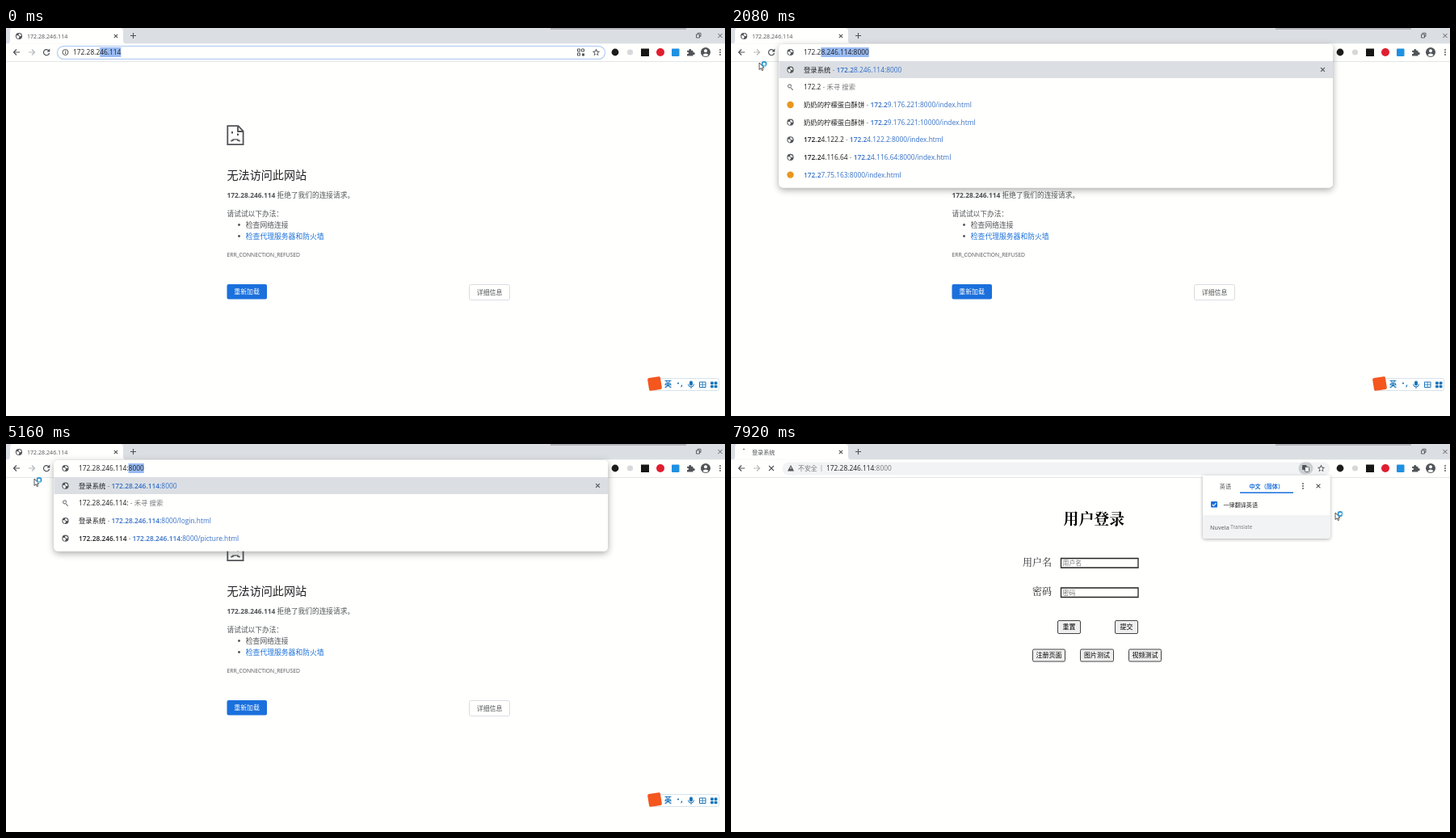
Recreate the animation shown at these times as an HTML page with a canvas. Size 890 by 480 pixels, loop 8000 ms.

```html
<!DOCTYPE html>
<html lang="zh-CN">
<head>
<meta charset="utf-8">
<style>
html, body { margin: 0; width: 100%; height: 100%; overflow: hidden; background: #fffffd; }
canvas { display: block; }
</style>
</head>
<body>
<canvas id="stage" width="890" height="480"></canvas>
<script>
const ctx = document.getElementById('stage').getContext('2d');
const LOOP = 8000;
const SANS = '"Open Sans", "Noto Sans CJK SC", "Noto Sans CJK", sans-serif';
const SERIF = '"Noto Serif CJK SC", "Noto Sans CJK SC", "Noto Sans CJK", serif';
const PAPER = '#fffffd', BAR = '#dbdfe4', PALE = '#f1f3f4';
const INK = '#202124', ICON = '#505357', GREY = '#777a7e', SOFT = '#b6b9bd';
const LINK = '#3570c8', BLUE = '#1a70dc', SELECT = '#98baf2', SHADOW = 'rgba(60, 64, 67, .45)';
const HOST = '172.28.246.114', PORT = ':8000', URL_SIZE = 8.4;

const ENTER = 6440, CLOSE = 6520, COMMIT = 6900, PAINT = 7280, POPUP = 7600;
const TYPE_START = 720;

// When each further character of the address is typed.
const keys = [720, 920, 1200, 1560, 1900, 2400, 2640, 2840, 3040, 3360, 3720,
  4040, 4320, 4680, 5040, 5320, 5600, 5920, 6200];

const globe = 'globe', lens = 'lens';
const recentList = [
  [globe, '登录系统', '127.0.0.1:8000/login.html'],
  [lens],
  ['#93cf92', '127.0.0.1', '127.0.0.1:1316'],
  [globe, '登录系统', '127.0.0.1:8000'],
  [globe, '127.0.0.1', '127.0.0.1:8000/login'],
  ['#807a70', '登录系统', '127.0.0.1:9006/login.html'],
  ['#807a70', 'WebServer', '127.0.0.1:9006']
];
const networkList = [
  [globe, '登录系统', HOST + PORT],
  [lens],
  ['#e8961e', '奶奶的柠檬蛋白酥饼', '172.29.176.221:8000/index.html'],
  [globe, '奶奶的柠檬蛋白酥饼', '172.29.176.221:10000/index.html'],
  [globe, '172.24.122.2', '172.24.122.2:8000/index.html'],
  [globe, '172.24.116.64', '172.24.116.64:8000/index.html'],
  ['#e8961e', '', '172.27.75.163:8000/index.html']
];
const hostList = [
  [globe, '登录系统', HOST + PORT],
  [lens],
  [globe, '登录系统', HOST + PORT + '/login.html'],
  [globe, HOST, HOST + PORT + '/picture.html']
];

const clamp = v => Math.max(0, Math.min(1, v));
const ease = v => { v = clamp(v); return v * v * (3 - 2 * v); };

function rect(x, y, w, h, fill, radius = 0, stroke, width = 1) {
  ctx.beginPath();
  ctx.roundRect(x, y, w, h, radius);
  if (fill) { ctx.fillStyle = fill; ctx.fill(); }
  if (stroke) { ctx.strokeStyle = stroke; ctx.lineWidth = width; ctx.stroke(); }
}
// A raised panel; its shadow stays outside so that it can fade in cleanly.
function panel(x, y, w, h, radius, blur) {
  ctx.save();
  ctx.beginPath();
  ctx.rect(0, 0, 890, 480);
  ctx.roundRect(x, y, w, h, radius);
  ctx.clip('evenodd');
  ctx.shadowColor = SHADOW;
  ctx.shadowBlur = blur;
  ctx.shadowOffsetY = blur / 3;
  rect(x, y, w, h, PAPER, radius);
  ctx.restore();
  rect(x, y, w, h, PAPER, radius);
}
function disc(x, y, r, color) {
  rect(x - r, y - r, 2 * r, 2 * r, color, r);
}
function shape(path, color) {
  ctx.fillStyle = color;
  ctx.fill(new Path2D(path));
}
function line(path, color = ICON, width = 1.1) {
  ctx.strokeStyle = color;
  ctx.lineWidth = width;
  ctx.stroke(new Path2D(path));
}
function setFont(size, weight = 400, family = SANS) {
  ctx.font = `${weight} ${size}px ${family}`;
}
// Draws text centred vertically on y and returns its right edge.
function text(s, x, y, size, color = INK, weight = 400, family = SANS) {
  setFont(size, weight, family);
  ctx.fillStyle = color;
  ctx.fillText(s, x, y + size * .36);
  return x + ctx.measureText(s).width;
}
function widthOf(s, size = URL_SIZE) {
  setFont(size);
  return ctx.measureText(s).width;
}
// Draws text with the part that matches the typed prefix in bold.
function matched(s, typed, x, y, color) {
  let n = 0;
  while (n < typed.length && s[n] === typed[n]) n++;
  x = text(s.slice(0, n), x, y, URL_SIZE, color, 600);
  return text(s.slice(n), x, y, URL_SIZE, color);
}

function drawGlobe(x, y) {
  disc(x, y, 4.1, ICON);
  shape(`M${x - 3} ${y - 1}l2.6 .6l1 1.6l-1.4 2.3q-2.6 -1 -2.2 -4.5z` +
    `M${x} ${y - 3.2}q2.8 .4 3.2 3l-2 .4l-1.6 -1.4z`, PAPER);
}
function drawIcon(icon, x, y) {
  if (icon === globe) drawGlobe(x, y);
  else if (icon === lens) {
    line(`M${x + 1} ${y - 1}a2 2 0 1 0 -.1 .3M${x + .6} ${y + .8}l2.6 2.6`, GREY, 1.1);
  } else disc(x, y, 4.2, icon);
}
function cross(x, y, r = 2.6, width = 1.1) {
  line(`M${x - r} ${y - r}l${2 * r} ${2 * r}m0 ${-2 * r}l${-2 * r} ${2 * r}`, ICON, width);
}
function dots(x, y) {
  for (const dy of [-3, 0, 3]) disc(x, y + dy, .9, ICON);
}
function arc(x, y, r, from, to, color, width) {
  ctx.beginPath();
  ctx.arc(x, y, r, from, to);
  ctx.strokeStyle = color;
  ctx.lineWidth = width;
  ctx.stroke();
}

function drawFrame(t) {
  rect(0, 0, 890, 19.5, BAR);
  rect(674, 0, 168, 2, '#b2b4ba');
  shape('M1 19.5Q5 19.5 5 15V4Q5 0 9 0H141Q145 0 145 4V15Q145 19.5 149 19.5Z', PAPER);
  if (t < CLOSE) drawGlobe(16, 10);
  else arc(16, 10, 3.6, t / 130, t / 130 + .6, GREY, 1.2);
  const title = t < CLOSE ? HOST : t < PAINT ? HOST + PORT : '登录系统';
  text(title, 26, 10, 7.1, ICON);
  cross(136, 10, 2.2);
  line('M154 9.5h7M157.5 6v7');
  line('M854.5 8h4v4h-4zM856 7.8v-1.5h4v4h-1.3', ICON, .9);
  cross(884, 9.5, 2.6, .9);

  rect(0, 19.5, 890, 21.5, PAPER);
  rect(0, 41, 890, 1, '#e3e5e8');
  line('M17 30H9.5M13 26.5L9.5 30L13 33.5', ICON, 1.2);
  line('M28 30h7.5M32 26.5L35.5 30L32 33.5', SOFT, 1.2);
  if (t < CLOSE) {
    line('M53.2 28.3A3.6 3.6 0 1 0 53.6 31', ICON, 1.2);
    shape('M54.3 25.6v3.8h-3.8z', ICON);
  } else cross(50, 30, 3);

  disc(754, 30, 4.4, '#1c1c1c');
  disc(772.5, 30, 3.6, '#d6d8da');
  rect(786, 25.5, 10, 9.5, '#161616');
  disc(810, 30, 5, '#e01e2f');
  rect(824, 25.5, 9.5, 9.5, '#2090e0', 1);
  shape('M843 28h2.4a1.5 1.5 0 1 1 2.8 0h2.3v2.3a1.5 1.5 0 1 1 0 2.6v1.6h-7.5v-2.4a1.3 1.3 0 1 0 0 -2.3z', ICON);
  disc(866, 30, 6, ICON);
  disc(866, 28.2, 2, PAPER);
  shape('M862.3 33.4q3.7 -3.6 7.4 0q-3.7 3 -7.4 0z', PAPER);
  dots(884, 30);
}

function drawAddress(t) {
  const committed = t >= COMMIT;
  rect(63.5, 22.5, 678, 16, committed ? PALE : PAPER, 8, committed ? '' : '#bcd3f4', 1.4);
  shape('M730.5 25.5l1.4 3l3.2 .4l-2.4 2.2l.7 3.2l-2.9 -1.7l-2.9 1.7l.7 -3.2l-2.4 -2.2l3.2 -.4z', ICON);
  shape('M730.5 27.7l.8 1.9l2 .2l-1.5 1.3l.4 2l-1.7 -1l-1.7 1l.4 -2l-1.5 -1.3l2 -.2z', PAPER);
  if (committed) {
    shape('M74 26l4 7.5h-8z', ICON);
    rect(73.5, 28.5, 1, 2.5, PAPER);
    text('不安全', 83, 30, 7.9, GREY);
    rect(111.5, 26, 1, 8, SOFT);
    text(PORT, text(HOST, 118, 30, URL_SIZE), 30, URL_SIZE, GREY);
    if (t >= POPUP) {
      rect(702.5, 22.5, 18, 15, '#cbced3', 7.5);
      rect(707, 26, 5.5, 6, ICON, 1);
      rect(710.5, 28.5, 5, 6, PAPER, 1, ICON, .9);
    }
    return;
  }
  for (const [x, y] of [[707.5, 26], [712.5, 26], [707.5, 31]]) rect(x, y, 3, 3, '', 0, ICON, 1);
  rect(713, 31.5, 3, 3, ICON);
  if (t >= CLOSE) {
    drawGlobe(73.5, 30);
    text(PORT, text(HOST, 83, 30, URL_SIZE), 30, URL_SIZE, GREY);
    return;
  }
  arc(73.5, 30, 3.5, 0, 7, ICON, 1);
  line('M73.5 29.6v2.4M73.5 27.8v1', ICON, 1);
  const kept = Math.max(0, 8 - Math.floor(t / 30));
  const from = 83 + widthOf(HOST.slice(0, kept));
  rect(from, 24, 83 + widthOf(HOST) - from, 12, SELECT);
  text(HOST, 83, 30, URL_SIZE);
}

function drawErrorPage() {
  line('M274.3 121.2H287.5L293.6 127.5V144.2H274.3ZM287 121.5V128H293.5', ICON, 1.8);
  rect(279, 128, 2, 2.5, ICON);
  rect(286, 130.5, 2, 2.5, ICON);
  line('M279 140.5v-1.3h2v-1.3h6v1.3h2v1.3', ICON, 1.4);
  text('无法访问此网站', 273.5, 182, 14.1);
  const x = text(HOST, 273.5, 206.5, URL_SIZE, ICON, 700);
  text(' 拒绝了我们的连接请求。', x, 206.5, 8.7, ICON);
  text('请试试以下办法：', 273.5, 229.5, 8.7, ICON);
  disc(288.5, 243.5, 1.4, ICON);
  disc(288.5, 257.5, 1.4, ICON);
  text('检查网络连接', 296.8, 243.5, 8.8, ICON);
  text('检查代理服务器和防火墙', 296.8, 257.5, 8.8, BLUE);
  text('ERR_CONNECTION_REFUSED', 273.5, 280.5, 6.75, ICON);
  rect(273.5, 317, 49.5, 18.5, BLUE, 2);
  text('重新加载', 282.3, 326.5, 7.9, '#fff');
  rect(573.5, 317.5, 50, 19, PAPER, 2, '#dadce0');
  text('详细信息', 582.8, 327, 7.9, ICON);
}

function drawInputBar() {
  rect(799.5, 433.5, 83, 15, '#fffffe', 2, '#d6e2ea');
  ctx.save();
  ctx.translate(803, 440);
  ctx.rotate(-.16);
  rect(-8, -8, 16, 16, '#f4561e', 2);
  ctx.restore();
  const tint = '#1874b8';
  text('英', 815, 441, 9, tint, 700);
  disc(832, 439.5, 1.1, tint);
  line('M836.5 441.5q.5 1.5 -1 2.5', tint, 1.3);
  rect(846, 436.5, 4, 6, tint, 2);
  line('M844.5 440.5q0 3.5 3.5 3.5t3.5 -3.5M848 444v2', tint, 1);
  rect(858.5, 438, 7.5, 6.5, '', 0, tint, 1);
  line('M858.5 441.2h7.5M862.2 438v6.5', tint, .8);
  for (const x of [872, 876.7]) for (const y of [437.5, 441.8]) rect(x, y, 3.8, 3.5, tint, 1);
}

function drawSuggestions(t) {
  const typed = t < 920 ? '1' : HOST.concat(PORT).slice(0, keys.filter(k => k <= t).length);
  const list = t < 920 ? recentList : t < 2600 ? networkList : hostList;
  const step = 21.65, bottom = 46 + list.length * step;

  ctx.save();
  ctx.globalAlpha = clamp((t - TYPE_START) / 130);
  panel(59.5, 20, 685.5, bottom - 20, 5, 8);
  rect(59.5, 41, 685.5, 21, BAR);
  cross(732.5, 51.5, 2.4);
  list.forEach(([icon, title, url], i) => {
    const y = 51.7 + i * step;
    drawIcon(icon, 73.5, y);
    if (icon === lens) {
      text(' - 禾寻 搜索', text(typed, 90, y, URL_SIZE), y, URL_SIZE, GREY);
      return;
    }
    let x = 90;
    if (title) x = text(' - ', matched(title, typed, x, y, INK), y, URL_SIZE, GREY);
    matched(url, typed, x, y, LINK);
  });
  ctx.restore();

  rect(59.5, 20, 685.5, 21, PAPER, [5, 5, 0, 0]);
  drawGlobe(73.5, 30);
  const full = list[0][2], start = 90 + widthOf(typed);
  rect(start, 24, 90 + widthOf(full) - start, 12, SELECT);
  if (t < ENTER) text(full, 90, 30, URL_SIZE);
  else text(PORT, text(HOST, 90, 30, URL_SIZE), 30, URL_SIZE, GREY);
}

function drawLogin() {
  text('用户登录', 411.5, 93.5, 18.9, '#000', 600, SERIF);
  for (const [label, x, y] of [['用户名', 361, 146.5], ['密码', 373, 183]]) {
    text(label, x, y, 12, INK, 400, SERIF);
    rect(408.5, y - 5, 95.5, 11.5, PAPER, 0, '#222', 1.3);
    text(label, 410.5, y + 1, 7.9, GREY);
  }
  const buttons = [['重置', 404, 218, 29, 17], ['提交', 475, 218, 29, 17],
    ['注册页面', 373, 253.5, 41, 16], ['图片测试', 432, 253.5, 42, 16], ['视频测试', 492, 253.5, 41, 16]];
  for (const [label, x, y, w, h] of buttons) {
    rect(x + .5, y + .5, w - 1, h - 1, '#efefef', 1.5, '#444', 1);
    text(label, x + (w - widthOf(label, 8)) / 2, y + h / 2, 8, '#000');
  }
}

function drawPopup(t) {
  ctx.save();
  ctx.globalAlpha = clamp((t - POPUP) / 120);
  panel(584, 39, 157.5, 77.5, 2, 4);
  rect(584, 88, 157.5, 28.5, PALE, [0, 0, 2, 2]);
  text('英语', 604.8, 52, 7.1, ICON);
  text('中文（简体）', 641.5, 52, 7.1, BLUE, 600);
  rect(630, 59.5, 66, 1.5, BLUE);
  dots(708, 52);
  cross(727, 52, 2.4);
  rect(594, 71, 8, 7.5, BLUE, 1);
  line('M595.7 74.8l1.7 1.7l3 -3.4', '#fff', 1.1);
  text('一律翻译英语', 609.5, 75, 7.1);
  text(' Translate', text('Nuvela', 593, 103, 7, GREY, 600), 103, 6.3, GREY);
  ctx.restore();
}

function drawPointer(t) {
  if (t < 240) return;
  const settle = ease((t - 240) / 280), travel = ease((t - COMMIT) / 880);
  const x = 62 - 27 * settle + 713 * travel, y = 30 + 13 * settle + 42 * travel;
  const path = `M${x} ${y}v8.5l2 -1.8l1.4 3l1.3 -.6l-1.3 -2.9h2.5z`;
  shape(path, '#fff');
  line(path, '#2c2c2c', .8);
  if (t < 600) return;
  arc(x + 6, y + 1.5, 2.6, 0, 7, '#2c92d0', 1.7);
  arc(x + 6, y + 1.5, 2.6, t / 160, t / 160 + 1.4, '#90d0f0', 1.5);
}

function draw(t) {
  rect(0, 0, 890, 480, PAPER);
  drawFrame(t);
  drawAddress(t);
  if (t < COMMIT) {
    drawErrorPage();
    drawInputBar();
  }
  if (t >= TYPE_START && t < CLOSE) drawSuggestions(t);
  if (t >= PAINT) drawLogin();
  if (t >= POPUP) drawPopup(t);
  drawPointer(t);
}

function tick() {
  draw(performance.now() % LOOP);
  requestAnimationFrame(tick);
}
tick();
</script>
</body>
</html>
```
